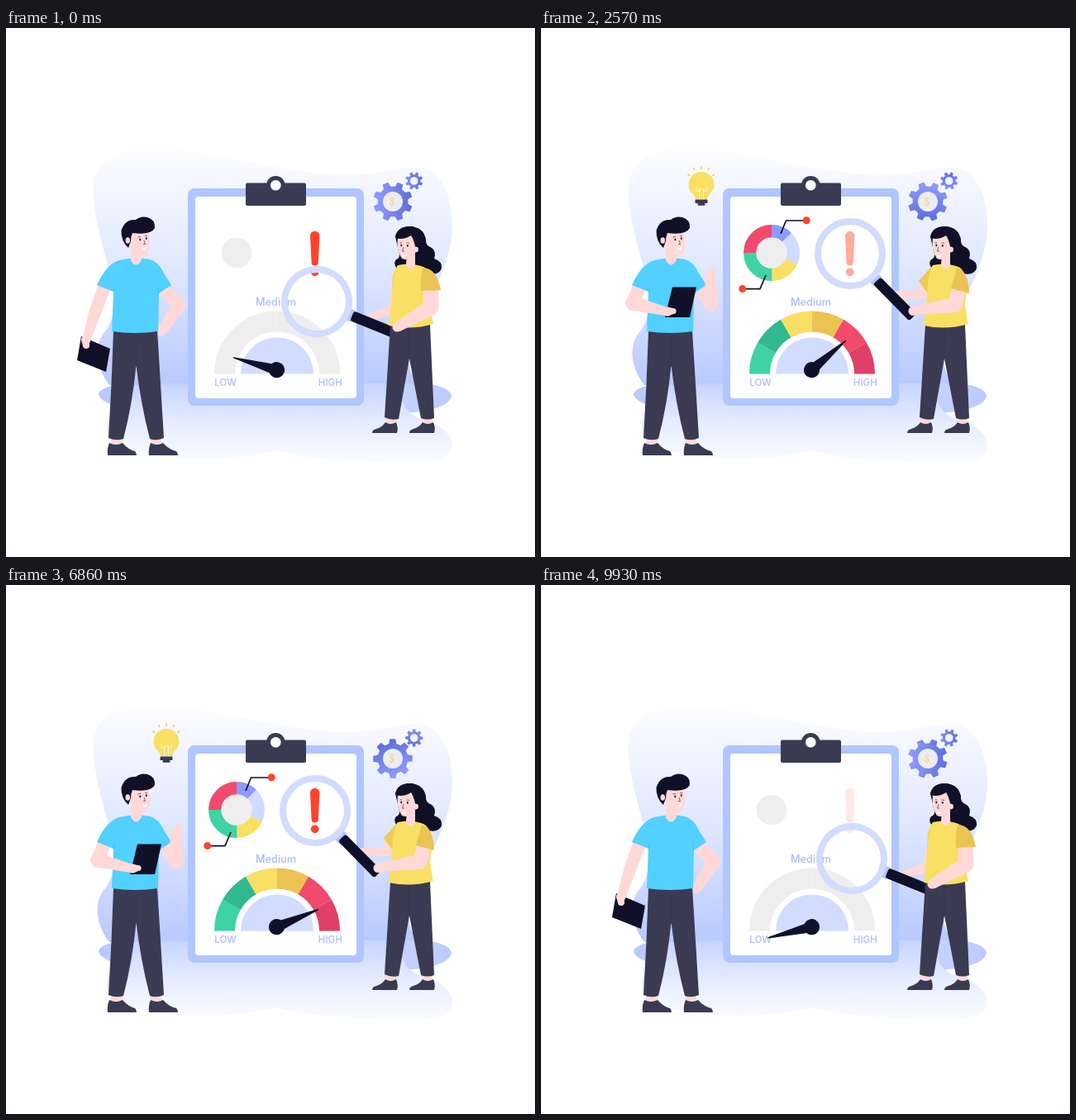
These frames come from a looping animation (640 px wide and 640 px high, 10000 ms). An HTML page with a canvas:

```html
<!DOCTYPE html>
<html lang="en">
<head>
<meta charset="utf-8">
<title>Risk gauge</title>
<style>
html, body { margin: 0; width: 100%; height: 100%; overflow: hidden; background: #fff; }
canvas { display: block; width: 640px; height: 640px; }
</style>
</head>
<body>
<canvas id="stage" width="640" height="640"></canvas>
<script>
const ctx = document.getElementById('stage').getContext('2d');
const LOOP = 10000, TAU = Math.PI * 2, RAD = Math.PI / 180;
const SKIN = '#ffd9d8', INK = '#101129', DARK = '#3a3b53', BLUE = '#b0c6ff', PALE = '#d1dcff';
const YELLOW = '#f9df63', GOLD = '#ebc352', RED = '#ff432c', LABEL = '#a9bdfb';

const clamp = v => Math.max(0, Math.min(1, v));
const ramp = (t, a, b) => clamp((t - a) / (b - a));
const ease = k => (1 - Math.cos(Math.PI * k)) / 2;
const mix = (a, b, k) => a + (b - a) * k;
const mixPoints = (a, b, k) => a.map((p, i) => p.map((v, j) => mix(v, b[i][j], k)));

function vertical(y0, y1, ...colors) {
  const g = ctx.createLinearGradient(0, y0, 0, y1);
  colors.forEach((c, i) => g.addColorStop(i / (colors.length - 1), c));
  return g;
}
function fill(d, color) {
  ctx.fillStyle = color;
  ctx.fill(new Path2D(d));
}
function line(d, color, width) {
  ctx.strokeStyle = color;
  ctx.lineWidth = width;
  ctx.stroke(new Path2D(d));
}
function disc(x, y, r, color, ry = r) {
  ctx.fillStyle = color;
  ctx.beginPath();
  ctx.ellipse(x, y, r, ry, 0, 0, TAU);
  ctx.fill();
}
function box(x, y, w, h, r, color) {
  ctx.fillStyle = color;
  ctx.beginPath();
  ctx.roundRect(x, y, w, h, r);
  ctx.fill();
}
function arc(x, y, r, from, to, color, width) {
  ctx.strokeStyle = color;
  ctx.lineWidth = width;
  ctx.beginPath();
  ctx.arc(x, y, r, from * RAD, to * RAD);
  ctx.stroke();
}
function label(text, x, y, font, color) {
  ctx.font = font;
  ctx.fillStyle = color;
  ctx.textAlign = 'center';
  ctx.fillText(text, x, y);
}
function poly(points, color) {
  fill('M' + points.map(p => p.join()).join('L') + 'Z', color);
}
// Tapered limb through [x, y, radius] joints
function limb(joints, color = SKIN) {
  joints.forEach(([x, y, r], i) => {
    disc(x, y, r, color);
    if (!i) return;
    const [px, py, pr] = joints[i - 1];
    const len = Math.hypot(x - px, y - py) || 1;
    const nx = (py - y) / len, ny = (x - px) / len;
    poly([[px + nx * pr, py + ny * pr], [x + nx * r, y + ny * r],
          [x - nx * r, y - ny * r], [px - nx * pr, py - ny * pr]], color);
  });
}
function placed(x, y, angle, draw) {
  ctx.save();
  ctx.translate(x, y);
  ctx.rotate(angle * RAD);
  draw();
  ctx.restore();
}

function background() {
  fill('M125 432C105 405 108 380 120 367C140 342 127 300 118 268C110 235 104 212 106 188C109 160 135 146 180 146C250 146 300 170 400 178C450 180 470 166 505 169C533 177 541 215 540 245C535 310 489 350 487 395C486 410 490 420 500 432Z',
    vertical(146, 432, '#fdfdff', '#e0e8ff', '#b9c9ff'));
  const ground = ctx.createLinearGradient(112, 0, 539, 0);
  ground.addColorStop(0, '#b9c9ff');
  ground.addColorStop(.6, '#d3deff');
  ground.addColorStop(1, '#bccbff');
  fill('M112 443C114 434 135 430 160 430H495C522 430 537 436 539 445C536 460 505 466 460 467H200C150 464 114 456 112 443Z', ground);
  fill('M128 432H470C482 450 480 465 500 472C530 480 542 495 540 508C536 525 505 528 470 526C415 524 365 522 328 511C285 522 225 524 180 517C140 510 120 496 122 480C124 465 140 462 128 432Z',
    vertical(430, 527, '#c6d3ff', '#e6edff', '#fbfcff'));
}

function gear(x, y, outer, root, angle, colors) {
  placed(x, y, angle, () => {
    const g = ctx.createLinearGradient(-outer, 0, outer, 0);
    g.addColorStop(0, colors[0]);
    g.addColorStop(1, colors[1]);
    const points = [];
    for (let i = 0; i < 8; i++) {
      for (const [off, r] of [[-14, root], [-8.5, outer], [8.5, outer], [14, root]]) {
        const a = (i * 45 + 22.5 + off) * RAD;
        points.push([r * Math.sin(a), -r * Math.cos(a)]);
      }
    }
    poly(points, g);
  });
}
function gears(t) {
  const turn = t / LOOP * 360;
  gear(468, 210, 24, 18.5, turn, ['#929eff', '#5e6cd9']);
  disc(468, 210, 12, '#ececf3');
  label('$', 467, 215, '14px "Noto Serif", serif', '#f3d684');
  gear(493.7, 185, 10.7, 7.8, -turn, ['#8490f4', '#6471dc']);
  disc(493.7, 185, 4.8, '#f1f4ff');
}

function bulb(show, rays) {
  if (show <= 0) return;
  ctx.save();
  ctx.globalAlpha = show;
  fill('M187 207C187 201 178.500 199 178.500 189.500A15.500 15.500 0 0 1 209.500 189.500C209.500 199 201 201 201 207Z', YELLOW);
  line('M191.500 207V195M196.500 207V195M191.500 195A2 2 0 1 1 189 193.500M196.500 195A2 2 0 1 0 199 193.500M191.500 195H196.500', '#fff6cc', 1);
  box(186.5, 207.5, 15, 4.5, 1, DARK);
  box(189.5, 212, 9, 2.8, 1, DARK);
  ctx.globalAlpha = rays;
  line('M194 171V167M186 172L184.500 169M202 172L203.500 169M180 179L177.500 176.500M207.500 179L210 176.500', GOLD, 1.3);
  ctx.restore();
}

function board(u, needle) {
  box(220, 194, 213, 263, 8, BLUE);
  box(229, 204, 195, 244, 4, '#fff');
  box(290, 187.5, 73, 27.5, 2, DARK);
  disc(326.3, 190.3, 11.3, DARK);
  disc(326.3, 190.3, 6.3, '#fff');

  const sweep = ease(ramp(u, 100, 1000));
  const slices = [['#8c9bfd', 45], ['#cfdbff', 115], [YELLOW, 179], ['#3fd2a5', 270], ['#f24a6c', 360]];
  let from = 0;
  for (const [color, end] of slices) {
    const to = Math.min(end, sweep * 360);
    if (to > from) arc(279, 272, 26.3, from - 90, to - 90, color, 15.4);
    from = end;
  }
  disc(279, 272, 18.3, '#eeeeee');

  arc(328, 418.5, 63.5, 180, 360, '#eeeeee', 25);
  line('M328 342V368', '#f7f7f7', .7);
  ['#3fd2a5', '#30b98f', YELLOW, GOLD, '#f24a6c', '#e04067'].forEach((color, i) => {
    const to = Math.min(i * 30 + 30, sweep * 180);
    if (to > i * 30) arc(328, 418.5, 63.5, 180 + i * 30, 180 + to, color, 25);
  });
  fill('M284 418.500A44 44 0 0 1 372 418.500Z', PALE);
  label('Medium', 326.5, 336, '500 12.7px Inter, sans-serif', LABEL);
  label('LOW', 265.5, 433.3, '500 11.5px Inter, sans-serif', LABEL);
  label('HIGH', 392.3, 433.3, '500 11.5px Inter, sans-serif', LABEL);

  placed(327.5, 413.7, -needle, () => {
    disc(0, 0, 9.6, INK);
    fill('M0 -6.500L54 -.700Q56 0 54 .700L0 6.500Z', INK);
  });

  const drawn = ramp(u, 1020, 1370);
  if (drawn > 0) {
    ctx.setLineDash([42 * drawn, 60]);
    line('M290 249L296.500 233H322', INK, 1.7);
    line('M272 299L265 315.700H243', INK, 1.7);
    ctx.setLineDash([]);
  }
  const dot = ease(ramp(u, 1520, 1800));
  disc(321.2, 232.7, 4.5 * dot, RED);
  disc(243.7, 315.6, 4.5 * dot, RED);
}

function warning(alpha) {
  ctx.globalAlpha = alpha;
  fill('M368 251.500A5.700 5.700 0 0 1 379.400 251.500L377.800 284Q377.500 287.500 373.700 287.500Q369.900 287.500 369.600 284Z', RED);
  disc(373.7, 295.3, 4.9, RED);
  ctx.globalAlpha = 1;
}

function magnifier(k) {
  placed(mix(376, 374, k), mix(331, 273, k), mix(22, 45.4, k), () => {
    box(40, -7.5, 8, 15, 1, BLUE);
    box(46, -6.3, 62, 12.6, 3, INK);
    arc(0, 0, 39, 0, 360, PALE, 8);
  });
}

function man(k, thumb) {
  const left = mixPoints([[120, 311, 8], [108, 343, 7.5], [97, 378, 5]],
                         [[119, 313, 8], [111, 333, 8.7], [152, 343, 5.2]], k);
  let right = mixPoints([[190, 315, 8], [209, 335, 8.3], [190, 365, 6]],
                        [[191, 315, 8], [208, 335, 8.7], [177, 341, 5.2]], k);
  right = mixPoints(right, [[193, 315, 8], [206, 334, 8.7], [205, 304, 6]], thumb);

  fill('M129 494H141V503H126Z M174 494H188V503H175Z', SKIN);
  fill('M125 502Q133 506 141 502Q148 510 156 512Q158 514 158 517H123Q122 509 125 502Z', DARK);
  fill('M175 502Q183 506 190 502Q197 510 206 512Q208 514 208 517H173Q172 509 175 502Z', DARK);
  fill('M130 366H183Q187 430 191 496Q182 500 174 497Q163 455 157.500 408Q153 455 142 497Q133 500 124 496Q128 430 130 366Z', DARK);
  line('M157.500 375V410', '#30314a', .6);

  limb(left.slice(0, 2));
  limb(right.slice(0, 2));
  fill('M137 281Q157 276 174 280Q185 283 191 297L200 311L185 321L184 367Q156 371 128 367L130 319L110 311Q121 286 137 281Z', '#52d0ff');
  line('M130 319L132 312M185 321L184 312', '#40bdf0', .7);

  // Head
  fill('M151 264V281Q157 292 164 281V270Z', SKIN);
  fill('M149 249Q160 246 173 248Q176 262 172 272Q167 279 159 274Q151 268 149 249Z', SKIN);
  fill('M148 266Q139 258 139.500 245Q144 231 157 232Q163 227 171 229Q181 232 180 242Q175 251 153 248Q151 252 151 258Z', INK);
  disc(147.3, 257, 2.8, SKIN, 3.8);
  disc(162.3, 256, .9, INK, 1.4);
  disc(169.8, 254.7, .9, INK, 1.4);
  line('M159.500 253L163 252.300M168 251.800L171 251.500M167 257L168.500 261.500H166', '#4b3444', .7);
  fill('M164.500 266Q168 267 171 264Q170 269 167 269Z', '#fff');

  poly(mixPoints([[91, 373], [126, 388], [121, 416], [86, 402]],
                 [[150, 350], [159, 313.5], [188, 313.5], [180, 350]], k), INK);
  limb(left.slice(1));
  limb(right.slice(1));
  const grip = mixPoints([[96, 377, 5], [97, 384, 4]], [[153, 343, 5.5], [160, 342.5, 3.6]], k);
  limb(grip);
  let palm = mixPoints([[190, 364, 6], [188, 369, 4]], [[175, 341, 5.6], [169, 342, 3.7]], k);
  palm = mixPoints(palm, [[205, 304, 6], [208.5, 292, 3.2]], thumb);
  limb(palm);
  const digit = mixPoints([[palm[0][0], palm[0][1], 2], [palm[1][0], palm[1][1], 2]],
                          [[203, 306, 3], [200.5, 297, 2]], thumb);
  limb(digit);
}

function womanBack(k) {
  limb(mixPoints([[475, 307, 7], [469, 340, 6], [441, 350, 4.5]],
                 [[464, 309, 6.5], [463, 322, 6], [427, 323, 4.6]], k));
}

function woman(k) {
  // Hair behind the face
  fill('M471 252Q474 240 489 240Q505 241 508 256Q507 263 515 266Q521 270 518 279Q528 282 527 291Q523 300 511 297Q501 300 496 290L473 291Q468 285 472 280Q478 278 475 270Z', INK);
  fill('M458 469H472V480H460Z M503 469H516V480H504Z', SKIN);
  fill('M459 477Q465 481 472 477Q475 484 473 490H443Q443 486 448 485Q455 483 459 477Z', DARK);
  fill('M504 477Q510 481 517 477Q520 484 518 490H488Q488 486 493 485Q500 483 504 477Z', DARK);
  fill('M465 359H513L518 472Q510 475 502 472L488 400L475 473Q466 475 458 471Z', DARK);
  line('M487.500 363L488 400', '#30314a', .6);

  poly(mixPoints([[472, 289], [468, 300], [467, 318], [477, 316]],
                 [[472, 289], [457, 306], [467, 320], [477, 316]], k), '#eecb55');
  fill('M474 287Q490 283 505 289Q514 293 515 312L513 335Q515 350 517 358Q490 366 463 360Q466 338 468 313Q469 293 474 287Z', YELLOW);

  fill('M485 272L495 272V287Q490 296 484 287Z', SKIN);
  fill('M474 251H496Q499 266 494 275Q488 282 479 279Q474 272 473.500 262Z', SKIN);
  fill('M471 254Q473 240 489 240Q505 241 508 256L501 273L495 264Q493 255 490 251Q481 257 471 254Z', INK);
  disc(496.5, 268, 2.4, SKIN, 3.3);
  disc(478.3, 263, .9, INK, 1.4);
  disc(485.8, 263.3, .9, INK, 1.4);
  line('M476.500 260L479 259.600M484.500 260L488 260.300M481 265L479.500 270H482', '#4b3444', .7);
  fill('M478.500 273.500Q481 276 485 274Q483 278 480 277Z', '#fff');

  const arm = mixPoints([[514, 312, 9], [514, 338, 9.5], [475, 361, 6]],
                        [[506, 312, 8], [501, 335, 9], [452, 341.5, 5.3]], k);
  limb(arm);
  const [, , [x, y]] = arm;
  limb([[x, y, 6], [x - 2, y + 1, 5.5]]);
  const [a, b, c, d] = mixPoints([[504, 290], [521, 290], [526, 317], [502, 318]],
                                 [[503, 290], [517, 293], [518, 321], [496, 315]], k);
  fill(`M${a}Q${b} ${c}L${d}Q${[a[0] - 3, a[1] + 12]} ${a}Z`, GOLD);
}

// Needle keys: time, degrees above the right-hand end
const needleKeys = [[0, 164], [650, 38], [1290, 32.5], [2570, 40.6], [4140, 35.6],
  [5640, 15.5], [8000, 29.4], [8700, 32], [9850, 203], [9930, 194], [LOOP, 164]];
function needleAngle(t) {
  const i = needleKeys.findIndex(key => key[0] > t);
  const [t0, a0] = needleKeys[i - 1], [t1, a1] = needleKeys[i];
  return mix(a0, a1, ease(ramp(t, t0, t1)));
}
function warningAlpha(t) {
  if (t < 70) return 1;
  return t < 8000 ? Math.min(1, .12 + .13 * t / 1000) : mix(1, .12, ramp(t, 8000, 9930));
}

function frame(now) {
  const t = now % LOOP;
  const u = Math.min(t, 9500 - t); // the second half plays backwards
  const raise = ease(ramp(u, 50, 1050));
  ctx.clearRect(0, 0, 640, 640);
  background();
  gears(t);
  bulb(ramp(u, 1750, 2150), ramp(u, 2000, 2350));
  board(u, needleAngle(t));
  warning(warningAlpha(t));
  womanBack(raise);
  magnifier(raise);
  woman(raise);
  man(raise, ease(ramp(u, 1520, 2100)));
  requestAnimationFrame(frame);
}
frame(0);
</script>
</body>
</html>
```
